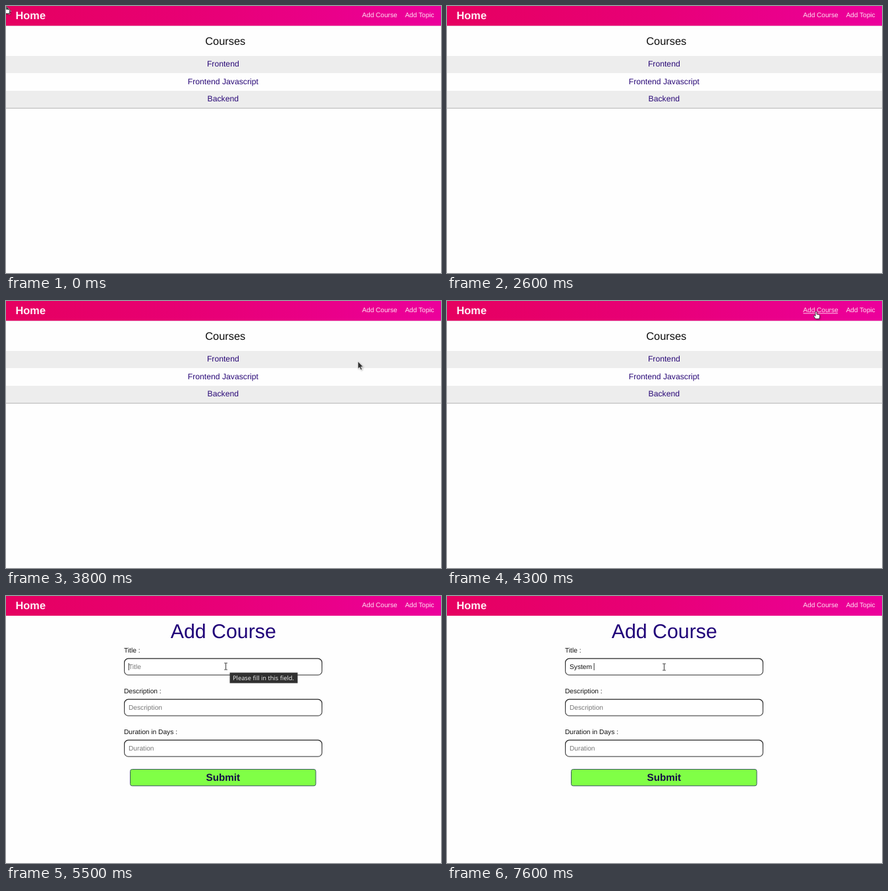
These frames come from a looping animation (660 px wide and 406 px high, 8000 ms). An HTML page:

```html
<!DOCTYPE html>
<html lang="en">
<head>
<meta charset="utf-8">
<title>Courses</title>
<style>
  html, body { margin: 0; width: 100%; height: 100%; overflow: hidden; background: #fefefe; }
  svg { display: block; width: 660px; height: 406px; }
  text { font-family: "Liberation Sans", Arial, sans-serif; text-rendering: geometricPrecision; white-space: pre; }
  .brand { font-size: 16.4px; font-weight: bold; fill: #fff0f8; }
  .nav { font-size: 10.1px; fill: #ffe3f3; }
  .heading { font-size: 16.4px; fill: #0c0c0c; }
  .link { font-size: 12.2px; fill: #2a0a78; text-anchor: middle; }
  .title { font-size: 30.3px; fill: #1f0078; }
  .label { font-size: 10.2px; fill: #111; }
  .hint { font-size: 10.2px; fill: #777; }
  .submit { font-size: 15.2px; font-weight: bold; fill: #140848; text-anchor: middle; }
  .ui { font-family: "Open Sans", "Noto Sans", sans-serif; font-size: 9.3px; }
</style>
</head>
<body>
<svg viewBox="0 0 660 406">
  <defs>
    <linearGradient id="bar" gradientUnits="userSpaceOnUse" x1="0" y1="0" x2="660" y2="30">
      <stop offset="0" stop-color="#e60060"/>
      <stop offset="0.5" stop-color="#e80078"/>
      <stop offset="1" stop-color="#ec009c"/>
    </linearGradient>
    <linearGradient id="edge" x1="0" y1="0" x2="0" y2="1">
      <stop offset="0" stop-color="#222"/>
      <stop offset="1" stop-color="#555"/>
    </linearGradient>
    <filter id="soft" x="-50%" y="-50%" width="200%" height="200%">
      <feDropShadow dx="0.8" dy="1" stdDeviation="0.8" flood-opacity="0.35"/>
    </filter>
  </defs>

  <rect width="660" height="406" fill="#fefefe"/>
  <rect width="660" height="30" fill="url(#bar)"/>
  <text class="brand" x="14.5" y="19.7">Home</text>
  <text class="nav" x="540.3" y="17.3">Add Course</text>
  <text class="nav" x="605.4" y="17.3">Add Topic</text>
  <path id="underline" d="M540.5 18.8H593" stroke="#ffe3f3" stroke-width="0.9"/>

  <g id="list">
    <path d="M0 30.3H660" stroke="#d9a5bf" stroke-width="0.6"/>
    <text class="heading" x="302.2" y="58.5">Courses</text>
    <path d="M0 76H660V102H0ZM0 129H660V155H0Z" fill="#ededed"/>
    <path d="M0 155.4H660" stroke="#b4b4b4"/>
    <text class="link" x="329.3" y="92.3">Frontend</text>
    <text class="link" x="329.3" y="118.8">Frontend Javascript</text>
    <text class="link" x="329.3" y="145.4">Backend</text>
  </g>

  <g id="form">
    <text class="title" x="249.8" y="64.4">Add Course</text>
    <g id="fields"></g>
    <rect x="188.5" y="263.5" width="281.5" height="25.2" rx="3" fill="#80ff46" stroke="#3c5a60"/>
    <text class="submit" x="329.3" y="280.5">Submit</text>
    <text id="typed" class="label" x="186" y="111.1"></text>
    <path id="caret" d="M0.5 102V113" stroke="#222" stroke-width="0.9"/>
  </g>

  <g id="status">
    <path d="M0 401H115.5Q117.5 401 117.5 403V406H0Z" fill="#dedede"/>
    <text class="ui" x="-3" y="410" fill="#555">localhost:3000/add-course</text>
  </g>
  <g id="tip">
    <rect x="339.5" y="116.5" width="103" height="16" fill="#303030"/>
    <text class="ui" x="344" y="128" fill="#f2f2f2">Please fill in this field.</text>
  </g>

  <g id="arrow" filter="url(#soft)">
    <path d="M0 0V11L2.5 8.8L4.3 12.8L6.2 12L4.5 8.1H7.8Z" fill="#2e2e2e" stroke="#eee" stroke-width="0.6"/>
  </g>
  <g id="hand" filter="url(#soft)">
    <path d="M-1 1Q0 -0.6 1 1V4.6L4.5 5.4Q5.8 5.8 5.6 7.5L4.8 11.5H-0.8L-3.6 7.6Q-3.8 6.2 -2.4 6.5L-1 7.6Z" fill="#fff" stroke="#333" stroke-width="0.8"/>
  </g>
  <g id="beam">
    <path d="M-2.5 -5H-0.6L0 -4.5L0.6 -5H2.5M-2.5 5H-0.6L0 4.5L0.6 5H2.5M0 -4.5V4.5" fill="none" stroke="#555" stroke-width="1.2"/>
  </g>
</svg>
<script>
const LOOP = 8000;
const $ = id => document.getElementById(id);
const show = (id, on) => $(id).setAttribute("opacity", Number(on));

$("fields").innerHTML = [
  ["Title :", "Title"],
  ["Description :", "Description"],
  ["Duration in Days :", "Duration"]
].map(([label, hint], i) => {
  const y = i * 62;
  return `<text class="label" x="179" y="${86 + y}">${label}</text>
    <rect x="179.6" y="${95.2 + y}" width="299.8" height="25" rx="6" fill="#fff" stroke="url(#edge)" stroke-width="1.2"/>
    <text class="hint" x="186" y="${111.1 + y}">${hint}</text>`;
}).join("");
const titleHint = document.querySelector(".hint");

// Pointer: start time in ms, shape, then one x,y point per 100 ms.
const moves = [
  [1200, "arrow", "60,262 108,304 139,314 205,309 330,234 420,186 480,148 520,121 535,103"],
  [2100, "arrow", "515,94 430,70 300,45 200,22 130,3"],
  [2600, "", "0,0"],
  [3100, "arrow", "20,197 110,150 236,48 271,43 360,54 420,94 500,98 534,92 548,54 556,32"],
  [4100, "hand", "559,17 560,16 560,15.5"],
  [4600, "hand", "557,19"],
  [4700, "arrow", "530,42 462,76"],
  [4900, "beam", "395,100 350,106 333.5,107"],
  [5900, "beam", "331.5,108 329.5,108"]
].map(([at, shape, pts]) => ({ at, shape, pts: pts.split(" ").map(p => p.split(",")) }));

const typing = [[6200, "S"], [6600, "Sy"], [6800, "Sys"], [7100, "Syst"], [7200, "System"], [7600, "System "]];
const advance = { S: 0.667, y: 0.5, s: 0.5, t: 0.278, e: 0.556, m: 0.833, " ": 0.278 };

function drawPointer(t) {
  const move = moves.filter(m => m.at <= t).pop();
  for (const id of ["arrow", "hand", "beam"]) show(id, move && move.shape === id);
  if (!move || !move.shape) return;
  const i = Math.min(move.pts.length - 1, Math.floor((t - move.at) / 100));
  $(move.shape).setAttribute("transform", `translate(${move.pts[i]})`);
}

function render(t) {
  const onForm = t >= 4500;
  show("list", !onForm);
  show("form", onForm);
  show("underline", t >= 4100 && t < 4700);
  show("status", t >= 4500 && t < 4800);
  show("tip", t < 5500 || t >= 5700 ? 0 : t < 5600 ? 1 : 0.5);

  const [, text] = typing.filter(([at]) => at <= t).pop() || [0, ""];
  $("typed").textContent = text;
  titleHint.setAttribute("opacity", text ? 0 : 1);
  const width = [...text].reduce((sum, c) => sum + advance[c] * 10.2, 0);
  $("caret").setAttribute("transform", `translate(${185.8 + width})`);
  show("caret", t >= 5500);
  drawPointer(t);
}

const start = performance.now();
function tick() {
  render((performance.now() - start) % LOOP);
  requestAnimationFrame(tick);
}
tick();
</script>
</body>
</html>
```
